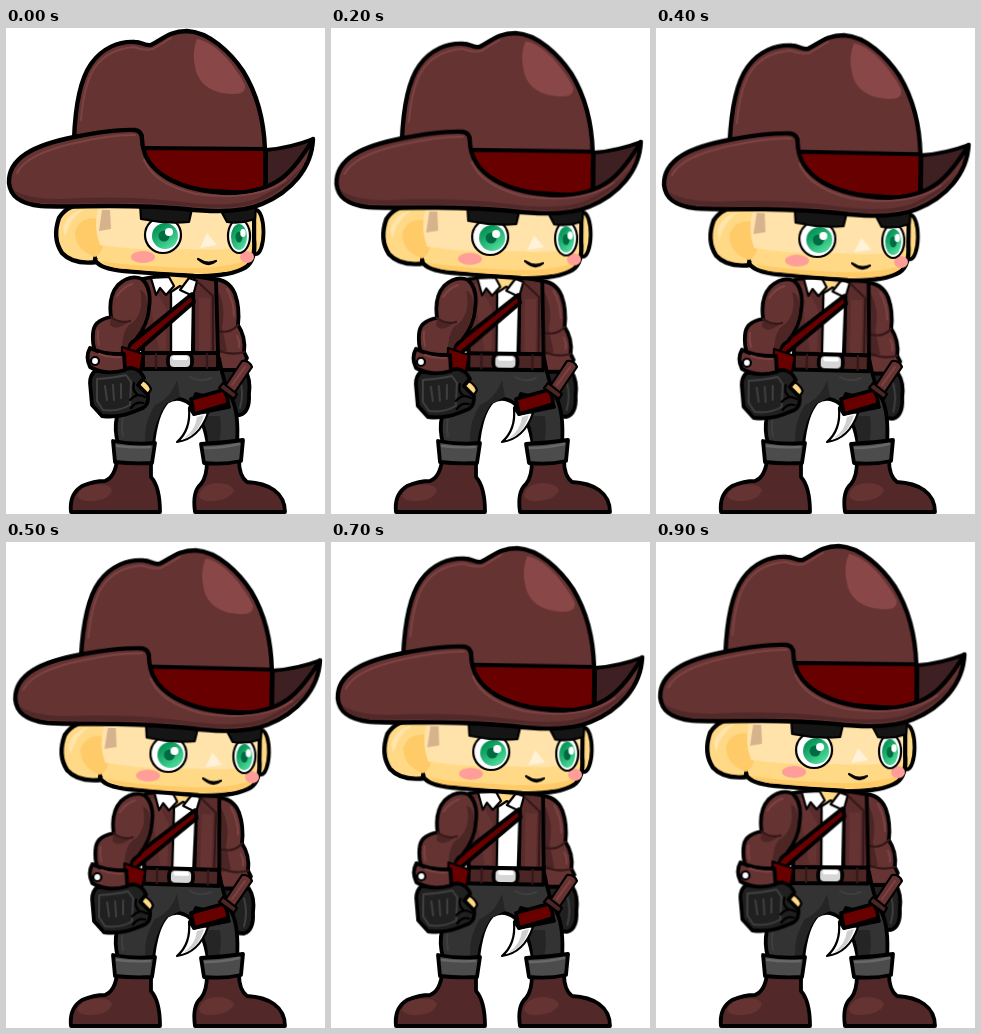
An HTML page that plays this animation: 319x486 px, repeating every 1 s.

```html
<!DOCTYPE html>
<html lang="en">
<head>
<meta charset="utf-8">
<title>Idle cowboy</title>
<style>
html, body { margin: 0; width: 100%; height: 100%; overflow: hidden; background: #fff; }
svg { display: block; width: 319px; height: 486px; }
path, ellipse, circle, rect { stroke: #000; stroke-width: 3.8; stroke-linejoin: round; stroke-linecap: round; }
.flat { stroke: none; }
.line { fill: none; }
.thin { stroke-width: 2.2; }
.bold { stroke-width: 4.4; }
.coat { fill: #5a2c2c; }
.felt { fill: #663333; }
.shade { fill: #4c2525; }
.boot { fill: #522828; }
.red { fill: #690000; }
.skin { fill: #ffd985; }
.cloth { fill: #333; }
.glove { fill: #202020; }
.turn { fill: #4c4c4c; }
.white { fill: #fff; }
.glow { fill: none; stroke: #7d4343; stroke-width: 2; }
.fold { fill: none; stroke: #351819; stroke-width: 2.2; }
.grey { fill: none; stroke: #3f3f3f; stroke-width: 2; }
.iris { fill: url(#iris); }

/* five held poses out, five back */
.move { animation: sway 1s steps(5, end) infinite; transform-origin: var(--o); }
@keyframes sway {
  0%, 100% { transform: translate(0, 0) rotate(0deg); }
  50% { transform: translate(var(--x), var(--y)) rotate(var(--r)); }
}
.head { --o: 150px 125px; --x: 6.8px; --y: 4.8px; --r: .95deg; }
.torso { --o: 175px 333px; --x: 1px; --y: 1.8px; --r: 1.7deg; }
.near { --o: 120px 265px; --x: 2.8px; --y: 2.4px; --r: .4deg; }
.far { --o: 224px 265px; --x: 4px; --y: 4.5px; --r: 0deg; }
</style>
</head>
<body>
<svg viewBox="0 0 319 486">
  <linearGradient id="iris" x1="0" y1="0" x2=".7" y2="1">
    <stop offset=".25" stop-color="#08985a"/>
    <stop offset="1" stop-color="#4fdc9c"/>
  </linearGradient>

  <g class="far move">
    <path class="glove" d="M213 340 L239 342 Q245 351 243 366 Q244 384 234 387 L217 386 L211 372Z"/>
    <path class="grey" d="M234 352 Q238 366 234 380"/>
    <path class="felt" d="M206 251 Q223 251 229 266 Q234 280 232 297 Q240 309 238 324 L241 330 L235 342 L208 342Z"/>
    <path class="flat shade" d="M209 258 Q221 276 216 299 L221 323 L210 326Z"/>
    <path class="fold" d="M212 303 Q224 306 232 297 M211 322 Q225 328 238 324"/>
    <path class="glow" d="M221 261 Q228 274 228 288 M231 308 Q234 314 233 319"/>
  </g>

  <path class="boot" d="M65 484 Q63 466 76 458 Q88 453 99 453 Q109 449 111 432 H145 V449 Q154 459 154 484Z"/>
  <path class="flat felt" d="M71 468 Q73 460 86 457 Q103 455 106 462 Q103 472 87 473 Q74 474 71 468Z"/>
  <path class="boot" d="M189 484 Q186 464 195 456 Q201 449 201 432 H233 Q233 448 241 454 Q258 455 268 462 Q279 470 279 484Z"/>
  <path class="flat felt" d="M193 467 Q196 456 210 455 Q226 455 228 463 Q223 472 207 473 Q194 474 193 467Z"/>

  <path class="cloth" d="M137 330 H213 Q217 354 226 371 Q233 386 231 416 L202 418 Q199 392 184 376 Q172 367 161 374 Q150 386 147 418 L112 415 Q108 402 111 388 Q114 369 131 358Z"/>
  <path class="flat" fill="#252525" d="M214 388 Q216 404 213 415 L202 416 Q202 398 194 388Z M149 377 Q138 393 139 415 L146 416 Q149 392 160 376 L174 369 L171 352 Q165 370 149 377Z"/>
  <path class="grey" d="M117 389 Q115 399 117 408 M184 349 Q194 355 205 350"/>
  <path class="turn" d="M107 413 Q128 417 149 415 L146 435 Q126 436 109 434Z"/>
  <path class="turn" d="M195 416 Q217 415 237 412 L235 433 Q218 437 198 435Z"/>
  <path class="line" style="stroke:#686868;stroke-width:2.4" d="M111 418 Q128 420 144 419 M199 420 Q217 420 233 416"/>

  <g class="torso move">
    <path class="coat" d="M136 251 Q174 243 210 252 L212 326 L137 326Z"/>
    <path class="flat felt" d="M193 270 H204 V323 H193Z M140 256 H146 L160 280 V322 H153Z"/>
    <path class="skin thin" d="M158 245 H189 L186 266 L174 272 L161 262Z"/>
    <path class="white thin" d="M165 264 L174 258 L187 265 L186 326 H165Z"/>
    <path class="white thin" d="M145 250 L163 249 L168 258 L160 267 L154 260 L150 267Z"/>
    <path class="white thin" d="M174 262 L183 250 L191 253 L187 268Z"/>
    <path class="line thin" d="M188 266 V325 M165 268 V325"/>
    <path class="fold" d="M192 254 L207 268 V322"/>
    <path class="red" d="M186 266 L188 274 L126 328 L118 321Z" stroke-width="2.6"/>
    <path class="shade" d="M137 325 H212 V341 H137Z"/>
    <path class="fold" d="M150 326 V340 M201 326 V340"/>
    <rect x="162" y="325" width="24" height="16" rx="6" fill="#d6d6d6" stroke-width="2.6"/>
    <path class="flat white" d="M167 328 H181 Q184 332 179 332 H168 Q165 330 167 328Z"/>
  </g>

  <g class="near move">
    <path class="felt" d="M136 251 Q124 246 112 257 Q102 268 105 289 Q87 292 87 306 Q86 318 91 328 L120 326 Q122 316 130 311 Q142 296 143 280 Q146 260 136 251Z"/>
    <path class="flat shade" d="M134 262 Q139 284 126 295 Q116 300 116 323 L121 321 Q122 313 129 309 Q140 295 141 280 Q142 264 134 262Z M105 289 Q113 297 123 293 Q111 304 104 297Z"/>
    <path class="fold" d="M105 289 Q114 296 124 293"/>
    <path class="glow" d="M111 268 Q117 259 126 256 M92 303 Q91 310 93 317"/>
    <path class="red thin" d="M116 319 L137 326 L134 343 L116 339Z"/>
    <path class="skin thin" d="M132 350 Q142 353 145 361 Q142 369 134 368Z"/>
    <path class="glove" d="M89 343 Q108 342 126 340 Q135 342 138 350 L132 357 L142 367 Q143 376 137 380 L127 384 Q112 390 96 388 L86 377 L84 355Q84 347 89 343Z"/>
    <path class="grey" d="M91 351 Q107 350 120 347 L125 354 L124 377 Q112 384 97 382 L91 373Z M99 358 L101 372 M107 357 L108 372 M115 356 V370"/>
    <path class="line thin" d="M124 372 Q131 364 139 369 M125 380 Q130 373 137 375 M128 355 Q126 363 131 366"/>
    <path class="felt" d="M84 320 Q98 327 118 326 L119 342 Q99 348 84 339 Q79 329 84 320Z"/>
    <path class="glow" d="M93 326 Q103 330 114 329"/>
    <circle class="white thin" cx="89" cy="333" r="4"/>
  </g>

  <path class="white thin" d="M183 380 Q185 402 171 414 Q193 411 202 385Z"/>
  <path class="flat" fill="#cfcfcf" d="M191 389 Q189 403 178 410 Q192 407 198 387Z"/>
  <path class="red" d="M190 366 L221 373 L223 379 L188 386 L184 380Z" stroke-width="2.8"/>
  <path class="red" d="M185 371 L217 362 Q222 367 222 376 L188 386Z" stroke-width="2.8"/>
  <path class="felt thin" d="M218 360 L236 333 Q243 332 246 339 L227 367Z"/>
  <path class="glow" d="M226 357 L239 339"/>
  <path class="shade thin" d="M217 355 L231 366 L228 371 L213 360Z"/>

  <g class="head move">
    <ellipse class="skin" cx="250" cy="204" rx="7.5" ry="22"/>
    <path class="skin bold" d="M94 177 Q64 172 53 190 Q46 210 56 225 Q67 237 91 234Z"/>
    <path class="skin bold" d="M92 172 H248 L248 211 Q250 232 240 239 Q223 249 188 248 L118 243 Q94 241 89 232 L92 218Z"/>
    <path class="flat skin" d="M82 170 H102 V230 H91 Q82 201 82 170Z"/>
    <path class="flat" fill="#ffcb68" d="M96 191 Q74 187 69 204 Q69 222 89 229 Q96 226 97 216Z"/>
    <path class="flat" fill="#ffe4ac" d="M57 200 Q62 184 78 181 Q64 190 59 209Z"/>
    <path class="flat" fill="#ffe3aa" d="M92 180 H246 V216 Q220 224 180 221 Q135 223 94 217Q87 200 92 180Z"/>
    <path class="flat" fill="#ffcb68" d="M95 233 Q121 238 184 240 Q224 240 244 231 Q239 241 219 244 Q180 247 120 241 Q103 240 95 233Z"/>
    <path class="flat" fill="#d6b38c" d="M96 182 H104 L105 201 L93 203Z"/>
    <path class="flat" fill="#fff2d8" d="M201 205 L211 217 L194 220Z"/>
    <ellipse class="flat" fill="#ff9e98" cx="137" cy="229" rx="12" ry="6"/>
    <ellipse class="flat" fill="#ff9e98" cx="241" cy="229" rx="7" ry="6"/>
    <circle class="white thin" cx="157" cy="207" r="18"/>
    <circle class="iris flat" cx="159" cy="208" r="13"/>
    <circle class="flat" fill="#006b40" cx="158" cy="208" r="5.5"/>
    <circle class="flat white" cx="163" cy="204" r="4"/>
    <ellipse class="white thin" cx="233" cy="208" rx="11" ry="17"/>
    <ellipse class="iris flat" cx="233" cy="209" rx="8" ry="13"/>
    <ellipse class="flat" fill="#006b40" cx="233" cy="209" rx="3.5" ry="5.5"/>
    <ellipse class="flat white" cx="237" cy="205" rx="2.7" ry="4"/>
    <path class="thin" d="M192 231 Q201 237 210 233 Q202 240 192 231Z"/>
    <path class="thin" fill="#151515" d="M134 176 L186 181 L183 194 Q159 196 135 191Z M214 181 L250 178 L249 191 Q235 196 221 194Z"/>

    <path class="felt bold" d="M68 112 C69 84 73 53 85 36 C96 20 113 13 129 14 C136 14 139 18 145 17 C156 12 163 3 181 3 C203 4 224 24 237 43 C250 64 258 91 259 122 L259 165 L138 160Z"/>
    <path class="flat" fill="#8a4747" d="M191 11 C209 14 228 36 239 57 Q240 66 228 66 C207 66 194 57 190 43 Q185 25 191 11Z"/>
    <path class="glow" d="M75 92 Q78 54 90 38 Q103 21 128 19 Q138 23 147 21 Q157 15 165 10"/>
    <path class="red" d="M137 120 L259 121 V166 L160 160 L138 139Z"/>
    <path fill="#3e2022" d="M260 122 Q284 120 307 111 Q297 146 260 164Z"/>
    <path class="felt bold" d="M3 155 C2 130 28 117 68 109 Q108 101 129 102 Q136 103 136 111 C137 145 173 163 224 165 C271 165 288 143 307 111 C306 140 285 164 256 176 Q231 187 179 181 C115 175 73 180 35 178 Q5 175 3 155Z"/>
    <path class="flat" fill="#522929" d="M7 161 Q18 171 56 171 Q117 167 176 174 Q225 180 250 171 Q283 156 297 137 Q286 158 252 174 Q230 183 179 178 C115 172 73 177 35 175 Q10 173 7 161Z"/>
    <path class="glow" d="M11 145 Q20 126 69 115 Q108 106 129 107 M138 132 Q148 156 190 166 Q249 174 280 152"/>
  </g>
</svg>
</body>
</html>
```
